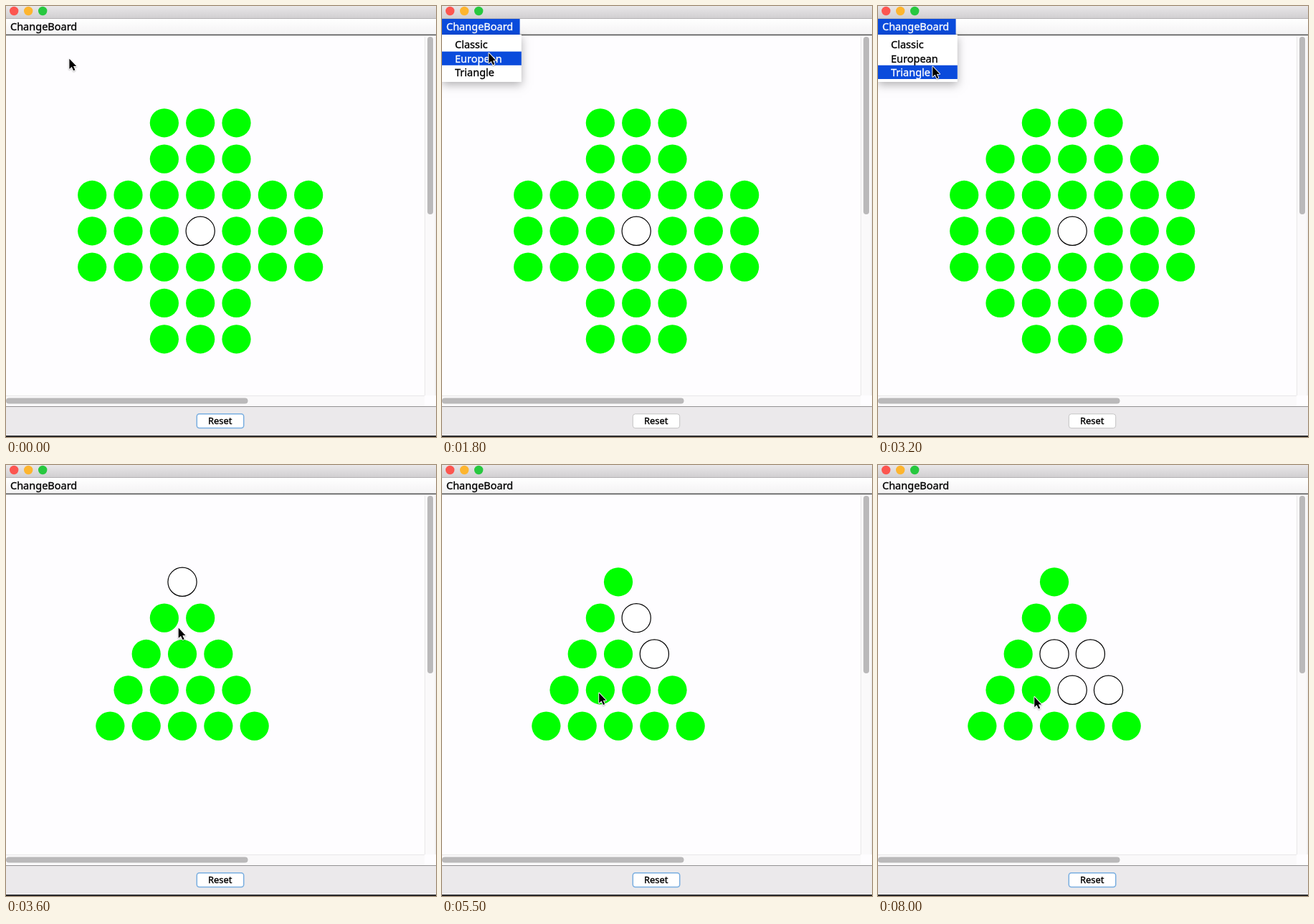
An HTML page with a canvas for the animation above (8.6 s loop, 600 px wide and 602 px high).

```html
<!DOCTYPE html>
<html lang="en">
<head>
<meta charset="utf-8">
<title>Peg board</title>
<style>
html, body { margin: 0; width: 100%; height: 100%; overflow: hidden; }
canvas { display: block; }
</style>
</head>
<body>
<canvas id="stage" width="600" height="602"></canvas>
<script>
const g = document.getElementById('stage').getContext('2d');
const LOOP = 8600, STEP = 100, PITCH = 50.33, ROW = 19.2, LIST_TOP = 44.4;
const GREEN = '#00ff00', BLUE = '#0a4bdc', PAPER = '#fefdff';
const FONT = '"Noto Sans", "Open Sans", sans-serif';
const BOARDS = ['Classic', 'European', 'Triangle'];

// Each board is chosen in turn: list opened, item clicked
const visits = [[500, 1100], [1500, 2000], [2600, 3300]];

// Triangle moves: picked, landed, [row, column] of start and end
const jumps = [
  [4100, 4900, [2, 2], [0, 0]],
  [5800, 6300, [3, 1], [1, 1]],
  [7100, 7600, [3, 3], [3, 1]]
];

const place = (row, col) => [120.2 + col * PITCH, 163.3 + row * PITCH];
const slot = ([r, c]) => place(r, 2.5 + c - r / 2);
const aim = spot => [slot(spot)[0] - 3, slot(spot)[1] + 9];

// The pointer visits every click, with two detours on the way
const stops = [
  [0, 88, 73], [4400, 291, 236], [6600, 259, 320],
  ...visits.flatMap(([open, pick], i) =>
    [[open, 50, 29], [pick, 56 + 10 * i, 51 + 16.5 * i]]),
  ...jumps.flatMap(([pick, land, from, to]) =>
    [[pick, ...aim(from)], [land, ...aim(to)]])
].sort((a, b) => a[0] - b[0]);

function pointer(t) {
  const i = stops.findIndex(s => s[0] > t);
  if (i < 0) return stops[stops.length - 1].slice(1);
  const [t0, x0, y0] = stops[i - 1], [t1, x1, y1] = stops[i];
  const k = 1 - (1 - (t - t0) / (t1 - t0)) ** 3;
  return [x0 + (x1 - x0) * k, y0 + (y1 - y0) * k];
}

function rect(x, y, w, h, color) {
  g.fillStyle = color;
  g.fillRect(x, y, w, h);
}

function shade(y, h, top, bottom) {
  const fill = g.createLinearGradient(0, y, 0, y + h);
  fill.addColorStop(0, top);
  fill.addColorStop(1, bottom);
  rect(0, y, 600, h, fill);
}

function paint(fill, line, width) {
  if (fill) { g.fillStyle = fill; g.fill(); }
  if (line) { g.strokeStyle = line; g.lineWidth = width; g.stroke(); }
}

function rounded(x, y, w, h, r, ...style) {
  g.beginPath();
  g.roundRect(x, y, w, h, r);
  paint(...style);
}

function disc(x, y, r, ...style) {
  g.beginPath();
  g.arc(x, y, r, 0, 2 * Math.PI);
  paint(...style);
}

// A hairline stroke gives the text its medium weight
function label(text, x, y, color = '#000', size = 14.5) {
  g.font = `${size}px ${FONT}`;
  g.fillStyle = g.strokeStyle = color;
  g.lineWidth = .35;
  g.fillText(text, x, y);
  g.strokeText(text, x, y);
}

function peg([x, y], state) {
  if (state === 'hole') disc(x, y, 20.1, '#fff', '#000', 1.2);
  else disc(x, y, 20.1, GREEN);
  if (state === 'picked') disc(x, y, 20, null, '#ff0000', 4);
}

function cross(reach) {
  for (let r = 0; r < 7; r++)
    for (let c = 0; c < 7; c++) {
      const dr = Math.abs(r - 3), dc = Math.abs(c - 3);
      if (Math.min(dr, dc) < 2 || dr + dc < reach)
        peg(place(r, c), dr + dc ? 'peg' : 'hole');
    }
}

function triangle(t) {
  const state = { '0,0': 'hole' };
  for (const [pick, land, from, to] of jumps) {
    const over = from.map((v, i) => (v + to[i]) / 2);
    if (t >= land) {
      state[from] = state[over] = 'hole';
      state[to] = 'peg';
    } else if (t >= pick) state[from] = 'picked';
  }
  for (let r = 0; r < 5; r++)
    for (let c = 0; c <= r; c++) peg(slot([r, c]), state[[r, c]]);
}

function windowFrame(active) {
  rect(0, 0, 600, 602, PAPER);
  shade(0, 17, '#e9e7e9', '#d1cfd1');
  rect(0, 17, 600, 1, '#b4b2b4');
  ['#fc5650', '#fdb52f', '#27c83f'].forEach((color, i) =>
    disc(11.2 + i * 20, 7, 6.2, color));
  shade(18, 22, '#ffffff', '#f3f2f3');
  rect(0, 39.6, 600, 1.6, '#555');

  rect(584, 42, 16, 502, '#faf9fa');
  rect(584, 42, 1, 502, '#e8e7e8');
  rect(598.5, 42, 1.5, 502, '#eeedee');
  rounded(588, 43, 8, 248, 4, '#bab9ba');
  rect(0, 544, 584, 15, '#faf9fa');
  rect(0, 544, 584, 1, '#e8e7e8');
  rounded(0, 547.5, 337.5, 8, 4, '#bab9ba');

  rect(0, 559, 600, 1, '#929192');
  rect(0, 560, 600, 40, '#ebe9eb');
  rect(0, 600, 600, 2, '#292829');
  rounded(266.3, 569.8, 65.4, 19.8, 3.5, '#fff',
    active ? '#79aee0' : '#c4c3c4', active ? 1.5 : 1);
  label('Reset', 282, 584, '#000', 12.9);
}

function menu(open, lit, y) {
  if (lit) rect(0, 18, 108.6, 22, BLUE);
  label('ChangeBoard', 6, 34, lit ? '#fff' : '#000');
  if (!open) return;
  g.save();
  g.shadowColor = 'rgba(0,0,0,.3)';
  g.shadowBlur = 12;
  g.shadowOffsetY = 4;
  rect(0, 40, 110.8, 66, '#fff');
  g.restore();
  const hover = Math.floor((y - LIST_TOP) / ROW);
  BOARDS.forEach((name, i) => {
    const top = LIST_TOP + i * ROW;
    if (i === hover) rect(0, top, 110.8, ROW, BLUE);
    label(name, 18, top + 14.9, i === hover ? '#fff' : '#000');
  });
}

function arrow(x, y) {
  const shape = new Path2D('M0 0V14.2L3.3 11.2L5.8 16.6L8 15.6L5.6 10.4H9.8Z');
  g.save();
  g.translate(x + .4, y + .7);
  g.lineJoin = 'round';
  g.strokeStyle = '#fff';
  g.lineWidth = 1.8;
  g.shadowColor = 'rgba(0,0,0,.3)';
  g.shadowBlur = 2;
  g.shadowOffsetY = 1;
  g.stroke(shape);
  g.shadowColor = 'transparent';
  g.fillStyle = '#000';
  g.fill(shape);
  g.restore();
}

function draw(now) {
  const t = Math.floor((now % LOOP) / STEP) * STEP;
  const [x, y] = pointer(t);
  const visit = visits.find(([open, pick]) => t >= open && t < pick + STEP);
  // The new board appears one step after its item is clicked
  const board = Math.max(0, visits.filter(v => t >= v[1] + STEP).length - 1);
  windowFrame(!visit);
  if (board < 2) cross(board ? 5 : 0);
  else triangle(t);
  menu(visit && t < visit[1], visit, y);
  arrow(x, y);
}

const start = performance.now();
function tick() {
  draw(performance.now() - start);
  requestAnimationFrame(tick);
}
tick();
</script>
</body>
</html>
```
